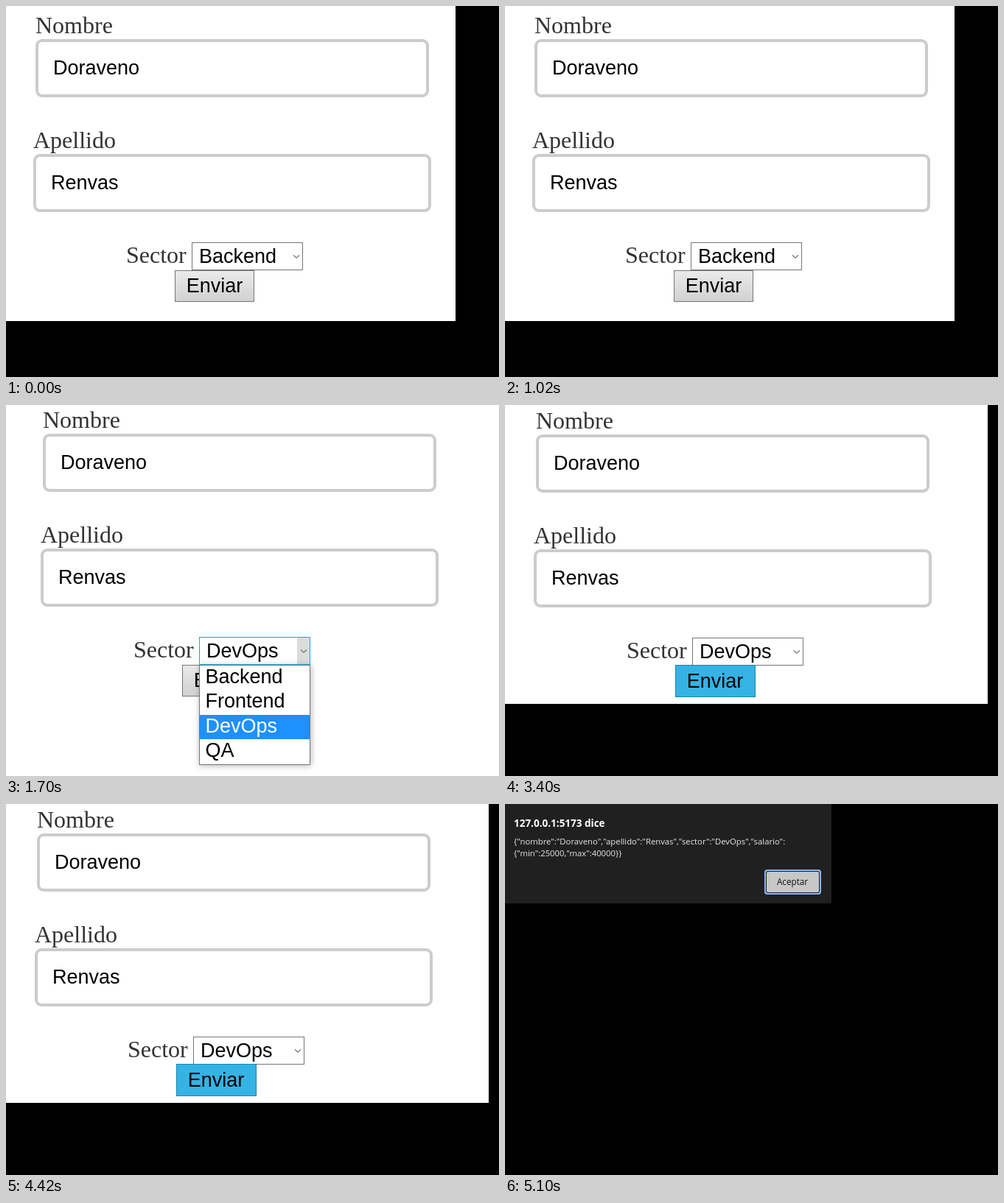
Animation of 669 by 504 pixels, one loop 6800 ms. Source, as an HTML page with a canvas:

```html
<!DOCTYPE html>
<html lang="es">
<head>
<meta charset="utf-8">
<title>Formulario</title>
<style>
html, body { margin: 0; width: 100%; height: 100%; overflow: hidden; background: #000; }
canvas { display: block; }
</style>
</head>
<body>
<canvas id="stage" width="669" height="504"></canvas>
<script>
const ctx = document.getElementById('stage').getContext('2d');
const HOLD = 1700;
const FIRST = 'Doraveno', LAST = 'Renvas';
const OPTIONS = ['Backend', 'Frontend', 'DevOps', 'QA'];
const SERIF = '32px "Liberation Serif", "Times New Roman", serif';
const SANS = '27px "Liberation Sans", Arial, sans-serif';
const ui = (size, weight = 400) => `${weight} ${size}px "Open Sans", "Noto Sans", sans-serif`;

function rect(x, y, w, h, fill) {
  ctx.fillStyle = fill;
  ctx.fillRect(x, y, w, h);
}

function box(x, y, w, h, fill, border) {
  rect(x, y, w, h, border);
  rect(x + 1, y + 1, w - 2, h - 2, fill);
}

function text(str, x, y, font, color, align = 'left') {
  ctx.font = font;
  ctx.fillStyle = color;
  ctx.textAlign = align;
  ctx.fillText(str, x, y);
}

function rounded(x, y, w, h, r, fill) {
  ctx.fillStyle = fill;
  ctx.beginPath();
  ctx.roundRect(x, y, w, h, r);
  ctx.fill();
}

function field(label, value, x, y, w) {
  text(label, x, y - 8, SERIF, '#333');
  rounded(x, y, w, 79, 9, '#ccc');
  rounded(x + 4, y + 4, w - 8, 71, 5, '#fff');
  text(value, x + 24, y + 48, SANS, '#000');
}

function select(value, open) {
  box(252, 321, 151, 38, '#fff', open ? '#2a9fd8' : '#767676');
  if (open) rect(385, 322, 17, 36, '#dcdcdc');
  text(value, 262, 349, SANS, '#000');
  ctx.strokeStyle = '#767676';
  ctx.lineWidth = 1.3;
  ctx.beginPath();
  ctx.moveTo(390, 338.5);
  ctx.lineTo(394, 342.2);
  ctx.lineTo(398, 338.5);
  ctx.stroke();
}

function button(hover) {
  if (hover) {
    box(229, 358, 109, 44, '#35b3e4', '#1787ad');
  } else {
    const shade = ctx.createLinearGradient(0, 359, 0, 402);
    shade.addColorStop(0, '#ebebeb');
    shade.addColorStop(1, '#d0d0d0');
    box(229, 359, 108, 43, shade, '#767676');
  }
  text('Enviar', 283, 389, SANS, '#000', 'center');
}

function list(chosen) {
  ctx.save();
  ctx.shadowColor = 'rgba(0,0,0,.3)';
  ctx.shadowBlur = 8;
  ctx.shadowOffsetX = ctx.shadowOffsetY = 1;
  rect(252, 359, 151, 136, '#767676');
  ctx.restore();
  rect(253, 360, 149, 134, '#fff');
  rect(252, 358, 151, 1, '#2a9fd8');
  OPTIONS.forEach((name, i) => {
    const top = 360 + Math.round(i * 33.4);
    const on = name === chosen;
    if (on) rect(253, top, 149, 33, '#1e90ff');
    text(name, 260.5, top + 24, SANS, on ? '#fff' : '#000');
  });
}

function form({ w, h, dx, dy, value, open, hover }) {
  rect(0, 0, w, h, '#fff');
  ctx.save();
  ctx.translate(dx, dy);
  field('Nombre', FIRST, 40, 45, 534);
  field('Apellido', LAST, 37, 201, 540);
  text('Sector', 163, 349, SERIF, '#333');
  select(value, open);
  button(hover);
  if (open) list(value);
  ctx.restore();
}

function dialog() {
  const lines = [
    `{"nombre":"${FIRST}","apellido":"${LAST}","sector":"DevOps","salario":`,
    '{"min":25000,"max":40000}}'
  ];
  rect(0, 0, 443, 135, '#202020');
  text('127.0.0.1:5173 dice', 12, 31, ui(13.5, 700), '#fff');
  lines.forEach((line, i) => text(line, 12, 55 + i * 16, ui(11.3), '#e8e8e8'));
  rounded(352, 89, 77, 34, 4, '#8ab4f8');
  rounded(354, 91, 73, 30, 3, '#202020');
  rounded(355, 92, 71, 28, 2, '#c7c7c7');
  text('Aceptar', 390, 110, ui(11.7), '#111', 'center');
}

const scenes = [
  () => form({ w: 610, h: 428, dx: 0, dy: 0, value: 'Backend' }),
  () => form({ w: 669, h: 504, dx: 10, dy: -6, value: 'DevOps', open: true }),
  () => form({ w: 655, h: 406, dx: 2, dy: -5, value: 'DevOps', hover: true }),
  dialog
];

const start = performance.now();
function draw() {
  const t = Math.max(0, performance.now() - start);
  rect(0, 0, 669, 504, '#000');
  scenes[Math.floor(t / HOLD) % scenes.length]();
  requestAnimationFrame(draw);
}
draw();
</script>
</body>
</html>
```
